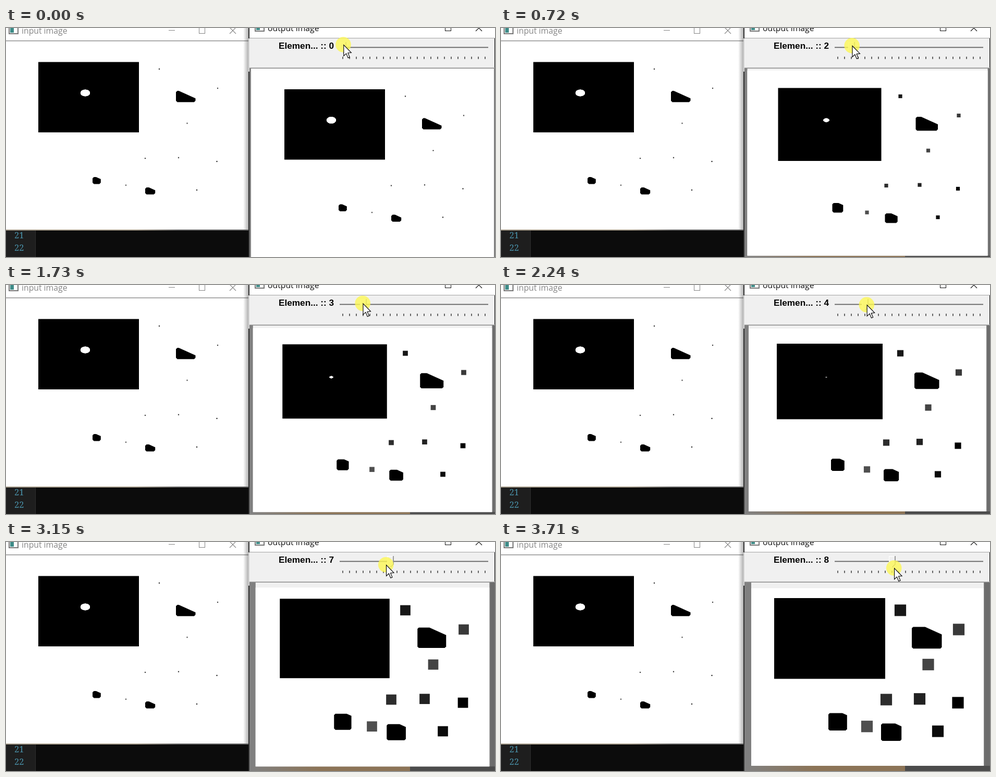
Recreate the animation shown at these times as an HTML page with a canvas. Size 938 by 441 pixels, loop 3.75 s.

```html
<!DOCTYPE html>
<html lang="en">
<head>
<meta charset="utf-8">
<title>Dilation slider</title>
<style>
  html, body { margin: 0; width: 100%; height: 100%; overflow: hidden; background: #0c0c0c; }
  canvas { display: block; }
</style>
</head>
<body>
<canvas id="stage" width="938" height="441"></canvas>
<script>
const ctx = document.getElementById('stage').getContext('2d');
const LOOP = 3750;
const STEP = 40;             // the pointer is sampled about every 40 ms
const NOTCH = 13;            // pixels between slider ticks
const SCALE = 1.25;          // pixels per kernel step

// Pointer drags: start, duration, distance reached in notches
const drags = [
  [40, 260, 1], [540, 180, 2], [1250, 110, 2.6], [1730, 140, 3.8],
  [2240, 180, 5.9], [3150, 110, 7.25], [3610, 100, 8.15]
];

// Left, top, right, bottom, width of the sloped top right corner
const blobs = [
  [62, 65.6, 255, 201, 0],
  [326, 121, 363.5, 142.7, 32],
  [166, 287, 181.8, 300.4, 9],
  [267, 307, 286.2, 320.6, 12]
];

// Specks, from darkest to lightest
const specks = [
  [404.5, 257], [366, 312], [294, 79], [331, 249.7],
  [267, 251], [406, 116], [347.5, 183.5], [230, 302.7]
];

function box(color, x, y, w, h) {
  ctx.fillStyle = color;
  ctx.fillRect(x, y, w, h);
}

function fade(x0, x1, from, to) {
  const gradient = ctx.createLinearGradient(x0, 0, x1, 0);
  gradient.addColorStop(0, from);
  gradient.addColorStop(1, to);
  return gradient;
}

function text(str, x, y, font, color) {
  ctx.font = font;
  ctx.fillStyle = color;
  ctx.fillText(str, x, y);
}

function polygon(color, ...points) {
  ctx.fillStyle = color;
  ctx.beginPath();
  points.forEach(p => ctx.lineTo(...p));
  ctx.closePath();
  ctx.fill();
}

function line(color, width, ...points) {
  ctx.strokeStyle = color;
  ctx.lineWidth = width;
  ctx.beginPath();
  points.forEach(p => ctx.lineTo(...p));
  ctx.stroke();
}

function stateAt(t) {
  let travel = 0;
  for (const [start, duration, reach] of drags) {
    if (t < start) break;
    const last = Math.round(duration / STEP);
    const step = Math.min(last, Math.floor((t - start) / duration * last + 1e-6));
    travel += (reach - travel) * (step + 1) / (last + 1);
  }
  return {
    x: 647 + 13.1 * travel,
    y: 32 + 0.627 * travel ** 1.6,
    value: Math.round(travel + 0.3)
  };
}

// Growing by a square keeps every corner cut the same and moves each side out by e
function grownBlob([left, top, right, bottom, cut], e) {
  const l = left - e, t = top - e, r = right + e, b = bottom + e;
  const bevel = cut ? 2.6 : 0;
  polygon('#000', [l, t + bevel], [l + bevel, t], [r - cut, t], [r, t + 0.45 * cut],
    [r, b - bevel], [r - bevel, b], [l + bevel, b], [l, b - bevel]);
}

// The white hole shrinks to what four shifted copies have in common
function shrunkHole(e) {
  if (e > 6) return;
  for (const sx of [-e, e]) {
    for (const sy of [-e, e]) {
      ctx.beginPath();
      ctx.ellipse(152 + sx, 125 + sy, 9.6, 6.9, 0, 0, 7);
      ctx.clip();
    }
  }
  box('#fff', 140, 115, 24, 20);
}

function picture(dx, dy, e) {
  ctx.save();
  ctx.translate(dx, dy);
  blobs.forEach(blob => grownBlob(blob, e));
  specks.forEach(([x, y], i) => {
    const grey = e ? 11.3 * i : 40 + 6 * i;
    const half = 1.1 + e;
    box(`rgb(${grey},${grey},${grey})`, x - half, y - half, 2 * half, 2 * half);
  });
  shrunkHole(e);
  ctx.restore();
}

function titleBar(x, y, label, color) {
  box('#777', x + 5, y - 10, 19, 17);
  box('#fff', x + 7, y - 6, 15, 11);
  box('#3f8c88', x + 8, y - 5, 7, 9);
  text(label, x + 30, y + 5.5, '15.75px "Open Sans", sans-serif', color);
  ctx.strokeStyle = color;
  ctx.lineWidth = 1;
  ctx.strokeRect(x + 370.5, y - 5.5, 11, 11);
  line(color, 1.1, [x + 429, y - 6], [x + 441, y + 6]);
  line(color, 1.1, [x + 441, y - 6], [x + 429, y + 6]);
}

function editor() {
  box('#0c0c0c', 0, 389, 467, 52);
  box('#1e1e1e', 0, 389, 56, 52);
  box('#303030', 56, 389, 1, 52);
  for (let i = 0; i < 3; i++) {
    text(21 + i, 16, 405 + 24 * i, '16.5px "Noto Serif", serif', '#4a93ab');
  }
}

function inputWindow() {
  box('#fff', 0, 0, 465, 388);
  box('#8a8a8a', 0, 24, 465, 1.4);
  box(fade(250, 330, '#aaa08f', '#6c6c6c'), 0, 388, 466, 2);
  box(fade(455, 465, 'rgba(0,0,0,0)', 'rgba(0,0,0,.3)'), 455, 0, 10, 388);
  box('#303030', 465, 0, 2, 441);
  box('#d4d4d4', 465, 20, 2, 64);
  titleBar(0, 5, 'input image', '#858585');
  line('#858585', 1, [312, 4.5], [324, 4.5]);
  picture(0, 0, 0);
}

function slider(value) {
  box('#f0f0f0', 467, 20, 470, 57);
  box('#a0a0a0', 467, 19, 471, 1);
  text('Elemen... :: ' + value, 523, 40.3, 'bold 17.2px "Liberation Sans", Arial, sans-serif', '#000');
  box('#a0a0a0', 640, 36, 285, 1);
  box('#747474', 640, 37, 285, 1.5);
  box('#fff', 640, 39, 285, 1);
  for (let i = 0; i < 22; i++) box('#222', 645.3 + NOTCH * i, 55.3, 1.4, 4.4);

  const x = 640 + NOTCH * value;
  polygon('#f0f0f0', [x, 27], [x + 12.5, 27], [x + 12.5, 43], [x + 6.5, 49], [x, 43]);
  line('#fff', 1.2, [x + 6.5, 48], [x + .6, 43], [x + .6, 27.6], [x + 12, 27.6]);
  line('#777', 1.4, [x + 12, 27], [x + 12, 43], [x + 6.5, 48.5]);
}

function outputWindow(value) {
  const e = value * SCALE;
  const left = 470 + e, right = 936 - e, bottom = 441 - e;
  box('#fff', 467, 0, 471, 19);
  titleBar(472, 0, 'output image', '#111');
  slider(value);

  // The picture's own dark rims grow inwards
  box('#808080', 467, 77, 471, 364);
  box('#6c6c6c', right + 1.5, 78, 938, 363);
  box(fade(470, 600, '#808080', '#8c7457'), 467, bottom, 308, e);
  box('#4c4c4c', 775, bottom, 163, e);
  box('#f0f0f0', left, 78, right - left, bottom - 78);
  box('#fff', left, 79 + e, right - left, bottom - 79 - e);
  box('#8c8c8c', 467, 76.5, 471, 1.3);
  picture(472, 52.5, e);
}

function pointer(x, y) {
  ctx.fillStyle = 'rgba(252,247,85,.8)';
  ctx.beginPath();
  ctx.arc(x, y, 14.8, 0, 7);
  ctx.fill();
  ctx.save();
  ctx.translate(x + .8, y + .6);
  ctx.scale(1.32, 1.32);
  polygon('#fff', [0, 0], [0, 16], [3.7, 12.5], [6.3, 18.8], [8.7, 17.8], [6.1, 11.7], [11, 11.3]);
  ctx.strokeStyle = '#000';
  ctx.lineWidth = .85;
  ctx.stroke();
  ctx.restore();
}

function draw() {
  const { x, y, value } = stateAt(performance.now() % LOOP);
  editor();
  inputWindow();
  outputWindow(value);
  pointer(x, y);
  requestAnimationFrame(draw);
}
draw();
</script>
</body>
</html>
```
